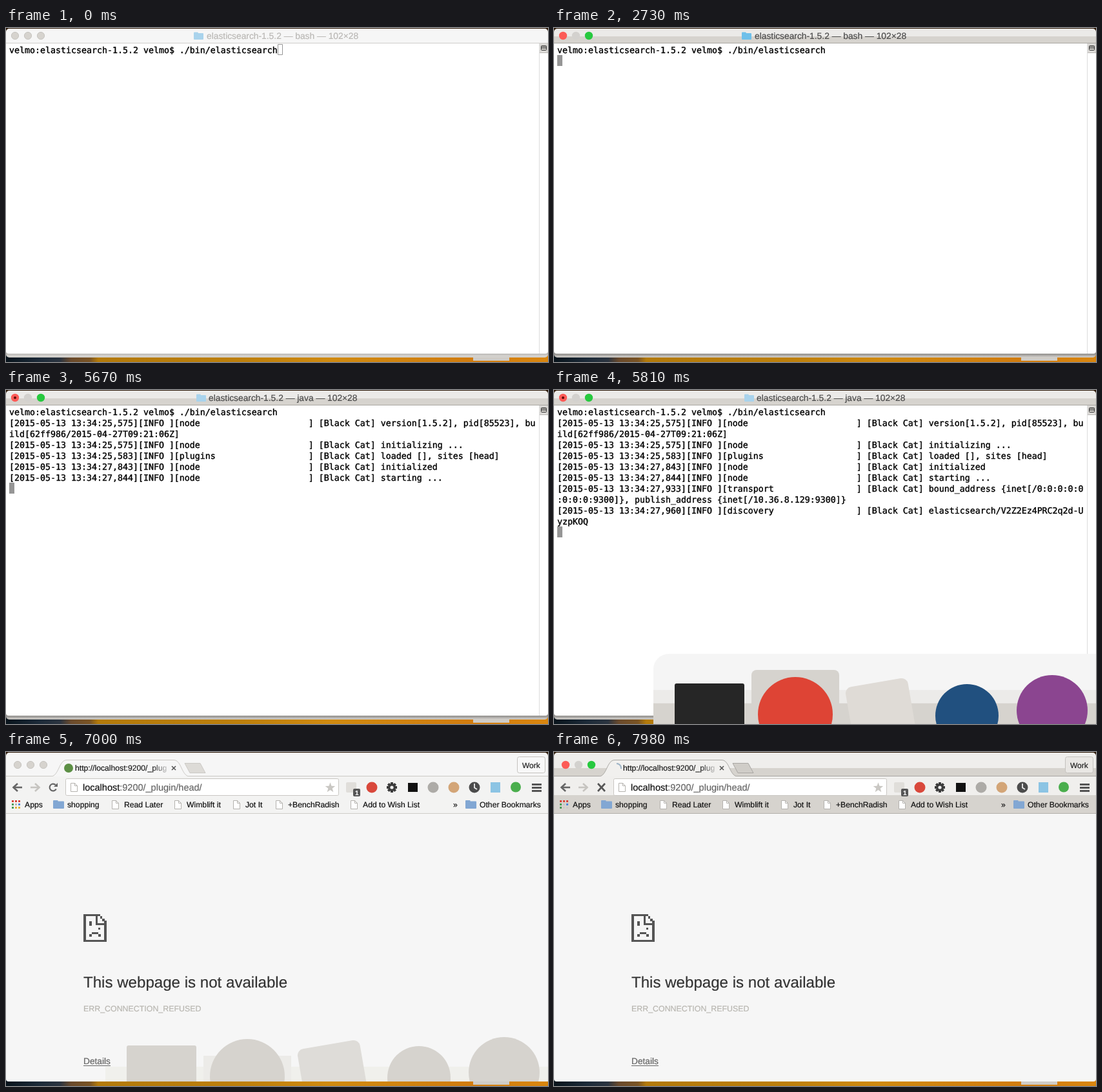
An HTML page with a canvas that plays this animation: 840x519 px, repeating every 8 s.

```html
<!DOCTYPE html>
<html lang="en">
<head>
<meta charset="utf-8">
<title>Starting a search node</title>
<style>
html, body { margin: 0; width: 100%; height: 100%; overflow: hidden; background: #fff; }
canvas { display: block; }
</style>
</head>
<body>
<canvas id="stage" width="840" height="519"></canvas>
<script>
const ctx = document.getElementById('stage').getContext('2d');
const W = 840, H = 519, LOOP = 8000;
const MONO = '13.29px "DejaVu Sans Mono", monospace';
const sans = size => `${size}px "Liberation Sans", Arial, sans-serif`;
const GREY = '#d6d3ce', PAPER = '#f6f6f6';

const AT = {
  focus: 1330, enter: 2730, java: 2800, boot: 3290, started: 5670, bound: 5740,
  switcher: 5810, browser: 6860, browserFocus: 7070, clear: 7140, loading: 7910, spin: 7980
};

// ---------- helpers ----------
function rect(x, y, w, h, color) {
  ctx.fillStyle = color;
  ctx.fillRect(x, y, w, h);
}
function box(x, y, w, h, r, fill, stroke) {
  ctx.beginPath();
  ctx.roundRect(x, y, w, h, r);
  if (fill) { ctx.fillStyle = fill; ctx.fill(); }
  if (stroke) { ctx.strokeStyle = stroke; ctx.lineWidth = 1; ctx.stroke(); }
}
function disc(x, y, r, fill, stroke) {
  ctx.beginPath();
  ctx.arc(x, y, r, 0, Math.PI * 2);
  ctx.fillStyle = fill;
  ctx.fill();
  if (stroke) { ctx.strokeStyle = stroke; ctx.lineWidth = 1; ctx.stroke(); }
}
function path(points, { fill, stroke, width = 1, close = false }) {
  ctx.beginPath();
  points.forEach(([x, y]) => ctx.lineTo(x, y));
  if (close) ctx.closePath();
  if (fill) { ctx.fillStyle = fill; ctx.fill(); }
  if (stroke) { ctx.strokeStyle = stroke; ctx.lineWidth = width; ctx.stroke(); }
}
// A hairline stroke gives the slightly heavier look of smoothed screen type.
function text(str, x, y, font, color, weight = 0.2) {
  ctx.font = font;
  ctx.fillStyle = ctx.strokeStyle = color;
  ctx.lineWidth = weight;
  ctx.lineJoin = 'round';
  ctx.fillText(str, x, y);
  ctx.strokeText(str, x, y);
  ctx.lineJoin = 'miter';
  return x + ctx.measureText(str).width;
}
function gradient(x0, y0, x1, y1, ...stops) {
  const g = ctx.createLinearGradient(x0, y0, x1, y1);
  stops.forEach(([pos, color]) => g.addColorStop(pos, color));
  return g;
}

// ---------- shared parts ----------
function desktop() {
  rect(0, 0, W, H, '#2b1705');
  rect(0, 506, W, 13, gradient(0, 0, W, 0,
    [0, '#08131b'], [0.06, '#1c2a38'], [0.1, '#2b3440'], [0.12, '#6a4a2c'],
    [0.155, '#7a5424'], [0.17, '#b37a0a'], [0.43, '#bd7f0b'], [0.6, '#d08a10'],
    [0.86, '#d17c0f'], [1, '#d9860f']));
  rect(724, 512, 56, 5, '#cfccc7');
}
function lights(x, y, active, edited) {
  const colors = active ? ['#fc5b57', '#d3d1ce', '#27c93f'] : [GREY, GREY, GREY];
  colors.forEach((color, i) => disc(x + 20 * i, y, active ? 6.2 : 5.6, color, active ? null : '#c6c4c0'));
  if (edited) disc(x, y, 2, '#5a0a08');
}
function folder(x, y, w, h, color) {
  box(x, y, w * 0.45, 4, 1, color);
  box(x, y + 1.5, w, h - 1.5, 1, color);
}
function page(x, y, w = 10, h = 13) {
  path([[x, y], [x + w - 4, y], [x + w, y + 4], [x + w, y + h], [x, y + h]],
    { fill: '#fff', stroke: '#b4b2ae', close: true });
  path([[x + w - 4, y], [x + w - 4, y + 4], [x + w, y + 4]], { stroke: '#b4b2ae' });
}

// ---------- terminal ----------
const COLS = 102;
const wrap = line => line.match(new RegExp(`.{1,${COLS}}`, 'g'));
const log = (time, module, message) =>
  wrap(`[2015-05-13 13:34:${time}][INFO ][${module.padEnd(25)}] [Black Cat] ${message}`);
const COMMAND = 'velmo:elasticsearch-1.5.2 velmo$ ./bin/elasticsearch';
const OUTPUT = [
  [AT.boot, log('25,575', 'node', 'version[1.5.2], pid[85523], build[62ff986/2015-04-27T09:21:06Z]')],
  [AT.boot, log('25,575', 'node', 'initializing ...')],
  [AT.boot, log('25,583', 'plugins', 'loaded [], sites [head]')],
  [AT.started, log('27,843', 'node', 'initialized')],
  [AT.started, log('27,844', 'node', 'starting ...')],
  [AT.bound, log('27,933', 'transport',
    'bound_address {inet[/0:0:0:0:0:0:0:0:9300]}, publish_address {inet[/10.36.8.129:9300]}')],
  [AT.bound, log('27,960', 'discovery', 'elasticsearch/V2Z2Ez4PRC2q2d-UyzpKOQ')]
];

function terminalTitle(t, active) {
  const java = t >= AT.java;
  box(0, 1, W, 22, [5, 5, 0, 0], active ? '#ebeae8' : PAPER);
  if (active) rect(0, 13, W, 10, GREY);
  rect(0, 23, W, 1, active ? '#a9a7a3' : '#d0cecb');
  lights(14, 12, active, java);
  folder(java ? 295 : 291, 6.5, 15, 11.5, active && !java ? '#6fc0ea' : '#a9d3ec');
  text(`elasticsearch-1.5.2 — ${java ? 'java' : 'bash'} — 102×28`,
    java ? 314 : 311, 17, sans(13.8), active ? '#4a4a4a' : '#b9b7b4');
}

function terminal(t) {
  const active = t >= AT.focus;
  box(0, 490, W, 22, [0, 0, 5, 5], gradient(0, 506, 0, 512,
    [0, active ? '#8f8d8a' : '#b5b3b0'], [0.4, active ? '#a9a7a4' : '#cfcdca'], [1, '#d6d3ce']));
  box(0, 23, W, 483, [0, 0, 4, 4], '#fff');
  terminalTitle(t, active);

  rect(826, 24, 1, 482, '#dcdcdc');
  rect(827, 24, 13, 15, '#dbd9d6');
  rect(827, 38, 13, 1, '#bcbab7');
  box(829.5, 27.5, 8, 7, 1, '#d6d3ce', '#333');
  rect(830, 29, 7, 1, '#333');
  rect(830, 31, 7, 1, '#555');

  const lines = [COMMAND];
  for (const [when, rows] of OUTPUT) if (t >= when) lines.push(...rows);
  lines.forEach((line, i) => text(line, 5, 39 + 17 * i, MONO, '#000', 0.4));

  const entered = t >= AT.enter;
  const x = entered ? 5 : 421, y = 25 + 17 * (entered ? lines.length : 0);
  if (active) rect(x, y, 8, 17, '#969696');
  else box(x + 0.5, y + 0.5, 7, 16, 0, '#fff', '#969696');
}

// ---------- application switcher ----------
function switcher(ghost) {
  const tint = color => ghost ? GREY : color;
  if (ghost) {
    rect(154, 489, 686, 23, '#f0f0ec');
    rect(306, 472, 136, 40, '#ecebe8');
  } else {
    box(154, 410, 720, 150, 24, gradient(0, 410, 0, 519,
      [0, '#f5f5f5'], [0.51, '#f5f5f5'], [0.52, '#ecebe9'], [0.7, '#ecebe9'], [0.71, GREY], [1, GREY]));
    box(306, 435, 136, 110, 8, GREY);
  }
  box(187, 456, 108, 108, 3, tint('#262626'));
  disc(374, 504, 58, tint('#de4435'));
  ctx.save();
  ctx.translate(507, 503);
  ctx.rotate(-0.17);
  box(-49, -49, 98, 98, 10, ghost ? '#dedcd8' : '#dfdbd6');
  ctx.restore();
  disc(640, 506, 49, tint('#21507f'));
  disc(772, 498, 55, tint('#8b4590'));
}

// The fading switcher only shows inside the browser window.
function fadingSwitcher(t) {
  const step = Math.floor((t - AT.browser) / 70);
  ctx.save();
  ctx.beginPath();
  ctx.rect(0, 0, W, 512);
  ctx.clip();
  ctx.globalAlpha = [0.8, 0.45, 1, 0.4][step];
  switcher(step >= 2);
  ctx.restore();
}

// ---------- browser ----------
function tabStrip(t, active) {
  const edge = active ? '#a9a7a3' : '#cbc9c5';
  box(0, 1, W, 60, [5, 5, 0, 0], active ? '#efeeec' : PAPER);
  if (active) rect(0, 25, W, 13, GREY);
  lights(18, 20, active, false);
  rect(0, 37, W, 1, edge);

  ctx.beginPath();
  ctx.moveTo(70, 38);
  ctx.bezierCurveTo(82, 37, 82, 12.5, 94, 12.5);
  ctx.lineTo(260, 12.5);
  ctx.bezierCurveTo(272, 12.5, 272, 37, 284, 38);
  ctx.fillStyle = active ? '#f1f0ee' : PAPER;
  ctx.fill();
  ctx.strokeStyle = edge;
  ctx.lineWidth = 1;
  ctx.stroke();
  path([[277, 17.5], [301, 17.5], [309, 32.5], [285, 32.5]],
    { fill: active ? '#d0cdc8' : '#dddbd7', stroke: edge, close: true });

  if (t < AT.loading) disc(97, 25, 7, '#5c8f45');
  else {
    const turn = t < AT.spin ? -Math.PI * 0.75 : -Math.PI / 2;
    ctx.beginPath();
    ctx.arc(97, 25, 7, turn, turn + Math.PI * 0.55);
    ctx.strokeStyle = '#9db3c6';
    ctx.lineWidth = 2;
    ctx.stroke();
  }
  text('http://localhost:9200/_plug', 107, 29, sans(12.2),
    gradient(107, 0, 251, 0, [0, '#111'], [0.83, '#222'], [1, 'rgba(60,60,60,0.15)']));
  path([[257, 22], [263, 28]], { stroke: '#555', width: 1.6 });
  path([[263, 22], [257, 28]], { stroke: '#555', width: 1.6 });
  box(792.5, 7.5, 43, 25, 3, active ? '#e9e7e4' : '#f8f8f8', '#c4c2be');
  text('Work', 800, 24.5, sans(12), '#222');
}

function arrow(x, y, dir, color) {
  path([[x - 7 * dir, y], [x + 7 * dir, y]], { stroke: color, width: 2.6 });
  path([[x, y - 6], [x + 6.5 * dir, y], [x, y + 6]], { stroke: color, width: 2.6 });
}
function reload() {
  ctx.beginPath();
  ctx.arc(73, 55, 5.4, 0.5, Math.PI * 1.75);
  ctx.strokeStyle = '#666';
  ctx.lineWidth = 2.2;
  ctx.stroke();
  path([[80, 48], [80, 54], [74, 54]], { fill: '#666', close: true });
}
function star(x, y) {
  const points = Array.from({ length: 10 }, (_, i) => {
    const r = i % 2 ? 3.4 : 8.2, a = i * Math.PI / 5 - Math.PI / 2;
    return [x + r * Math.cos(a), y + r * Math.sin(a)];
  });
  path(points, { fill: '#c9c7c3', close: true });
}
function gear(x, y) {
  for (let i = 0; i < 8; i++) {
    ctx.save();
    ctx.translate(x, y);
    ctx.rotate(i * Math.PI / 4);
    rect(-2, -8, 4, 5, '#3b3b3b');
    ctx.restore();
  }
  disc(x, y, 6, '#3b3b3b');
  disc(x, y, 2.6, '#f0f0f0');
}

function toolbar(t, active) {
  rect(0, 38, W, 58, active ? '#f0efed' : '#f3f3f2');
  if (active) rect(0, 67, W, 29, GREY);
  arrow(18, 55, -1, '#666');
  arrow(45, 55, 1, '#c6c4c0');
  if (t < AT.loading) reload();
  else {
    path([[68, 49], [79, 61]], { stroke: '#555', width: 2.6 });
    path([[79, 49], [68, 61]], { stroke: '#555', width: 2.6 });
  }

  box(92.5, 41.5, 423, 26, 2, '#fff', '#c9c7c3');
  page(100.5, 48.5);
  const x = text('localhost', 119, 60, sans(14.5), '#111');
  text(':9200/_plugin/head/', x, 60, sans(14.5), '#666');
  star(502.5, 55.5);

  box(527, 47, 16, 16, 2, '#e0deda');
  box(538, 57, 11, 12, 2, '#555');
  text('1', 541, 67, 'bold ' + sans(10), '#fff');
  disc(567, 55, 8.5, '#d9483b');
  gear(598, 55);
  rect(623, 48, 15, 14, '#111');
  disc(662, 55, 8.5, '#adaba7');
  disc(694, 55, 8.5, '#d3a577');
  disc(726, 55, 8.5, '#4c4c4c');
  path([[726, 49], [726, 55.5], [730, 58]], { stroke: '#eee', width: 1.8 });
  rect(751, 47, 15, 16, '#8cc4e4');
  disc(790, 54.5, 8, '#4aae4d');
  for (let i = 0; i < 3; i++) rect(815, 49 + 5 * i, 15, 3, '#555');
}

const BOOKMARKS = [
  ['Read Later', 183], ['Wimblift it', 280], ['Jot It', 371],
  ['+BenchRadish', 437], ['Add to Wish List', 553]
];
function bookmarks(active) {
  const label = (str, x) => text(str, x, 86, sans(12.2), '#111');
  const dots = ['#d8453a', '#d8453a', '#d8453a', '#4b9b57', active ? '#c9c6c1' : '#b9b7b2',
    '#4c86d8', '#4b9b57', active ? '#cfccc6' : '#e0b23c', active ? '#cfccc6' : '#e0b23c'];
  dots.forEach((color, i) => rect(9 + 5 * (i % 3), 75 + 5 * Math.floor(i / 3), 3, 3, color));
  label('Apps', 29);
  folder(73, 75, 17, 13, '#82a7d3');
  label('shopping', 95);
  for (const [name, x] of BOOKMARKS) {
    page(x - 18.5, 75.5);
    label(name, x);
  }
  label('»', 693);
  folder(712, 75, 17, 13, '#82a7d3');
  label('Other Bookmarks', 734);
  rect(0, 95, W, 1, active ? '#b3b0ab' : '#cfcdc9');
}

function sadPage(x, y) {
  const parts = [
    [0, 0, 22, 3], [0, 0, 4, 43], [0, 40, 36, 3], [32, 14, 4, 29],
    [19, 0, 3, 17], [19, 14, 17, 3], [22, 0, 4, 3], [26, 3, 3, 4], [29, 7, 4, 4], [32, 10, 4, 4],
    [9, 11, 4, 7], [23, 21, 3, 3],
    [13, 28, 10, 3], [9, 31, 4, 4], [23, 31, 4, 4]
  ];
  for (const [dx, dy, w, h] of parts) rect(x + dx, y + dy, w, h, '#555');
}

function browser(t) {
  const active = t >= AT.browserFocus;
  tabStrip(t, active);
  toolbar(t, active);
  bookmarks(active);
  box(0, 96, W, 416, [0, 0, 4, 4], PAPER);
  sadPage(120, 252);
  text('This webpage is not available', 120, 366, sans(24.1), '#333');
  text('ERR_CONNECTION_REFUSED', 120, 403, sans(12.4), '#b7b5af');
  text('Details', 120, 485, sans(13.7), '#666');
  rect(120, 487, 42, 1, '#666');
}

// ---------- timeline ----------
function draw(t) {
  ctx.textRendering = 'geometricPrecision';
  desktop();
  if (t < AT.browser) {
    terminal(t);
    if (t >= AT.switcher) switcher(false);
    return;
  }
  browser(t);
  if (t < AT.clear) fadingSwitcher(t);
}

const start = performance.now();
function tick() {
  draw((performance.now() - start) % LOOP);
  requestAnimationFrame(tick);
}
tick();
</script>
</body>
</html>
```
